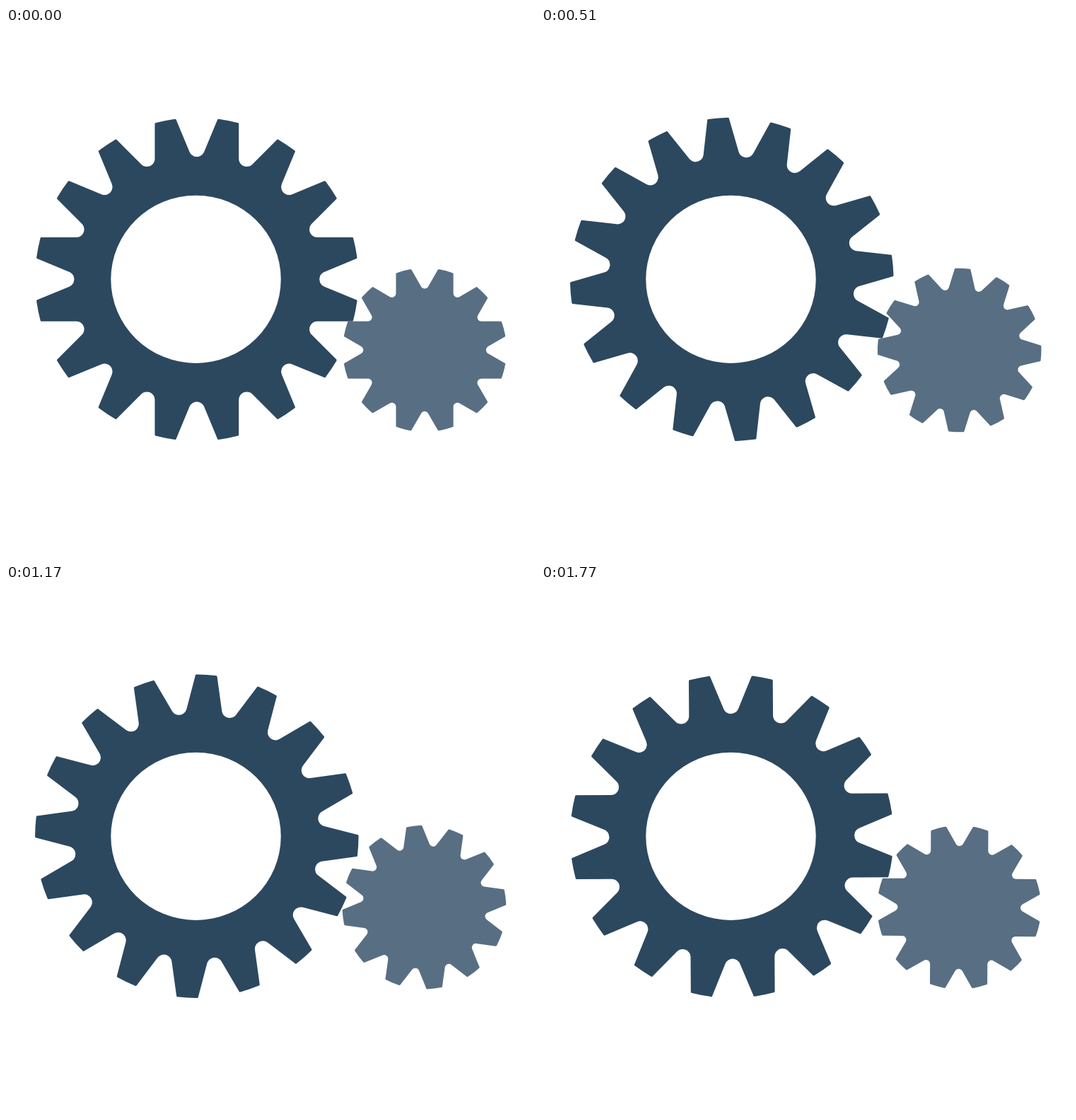
Animation of 748 by 748 pixels, one loop 1.8 s. Source, as an HTML page with a canvas:

```html
<!DOCTYPE html>
<html lang="en">
<head>
<meta charset="utf-8">
<title>Gears</title>
<style>
  html, body { margin: 0; width: 100%; height: 100%; overflow: hidden; background: #fff; }
  canvas { display: block; }
</style>
</head>
<body>
<canvas id="stage" width="748" height="748"></canvas>
<script>
const ctx = document.getElementById('stage').getContext('2d');
const LOOP = 1800, STEP = 30, RAD = Math.PI / 180;

// Angles run clockwise from the top.
const polar = (r, a) => [r * Math.sin(a), -r * Math.cos(a)];

// Tapered teeth with round valleys; a valley sits at the top.
function gearPath(teeth, outer, inner, halfTip) {
  const path = new Path2D();
  const pitch = 2 * Math.PI / teeth;
  const lean = pitch;
  const edge = pitch / 2 - halfTip;
  const [px, py] = polar(outer, edge);
  const r = (px * Math.cos(lean) + (inner + py) * Math.sin(lean)) / (1 - Math.sin(lean));
  const mid = inner + r;
  const nick = 3 / outer;
  const corner = 1.2;

  for (let i = 0; i < teeth; i++) {
    const g = i * pitch, next = g + pitch;
    const a1 = g + edge, a2 = next - edge;
    path.arc(...polar(mid, g), r, g + Math.PI - lean, g + lean, true);
    path.arcTo(...polar(outer, a1), ...polar(outer, a1 + nick), corner);
    path.arc(0, 0, outer, a1 + nick - Math.PI / 2, a2 - nick - Math.PI / 2);
    const [cx, cy] = polar(mid, next);
    const t = next + Math.PI - lean;
    path.arcTo(...polar(outer, a2), cx + r * Math.cos(t), cy + r * Math.sin(t), corner);
  }
  path.closePath();
  return path;
}

const big = gearPath(16, 228.7, 173.3, 3.8 * RAD);
const small = gearPath(12, 115.8, 86.8, 5.5 * RAD);

function drawGear(path, x, y, deg, color) {
  ctx.save();
  ctx.translate(x, y);
  ctx.rotate(deg * RAD);
  ctx.fillStyle = color;
  ctx.fill(path);
  ctx.restore();
}

function draw(t) {
  ctx.fillStyle = '#fff';
  ctx.fillRect(0, 0, 748, 748);

  drawGear(big, 269.8, 355.3, 22.5 * t / LOOP, '#2c485f');
  ctx.fillStyle = '#fff';
  ctx.beginPath();
  ctx.ellipse(268.5, 355.3, 120.2, 118.6, 0, 0, 2 * Math.PI);
  ctx.fill();

  // The small gear turns twice as fast for the first third.
  const turn = t < 600 ? t / 40 : 15 + (t - 600) / 80;
  const drift = turn / 30;
  drawGear(small, 592 - 0.8 * drift, 455.3 + 0.6 * drift, -turn, '#586e83');
}

const start = performance.now();
function tick() {
  const t = (performance.now() - start) % LOOP;
  draw(Math.floor(t / STEP) * STEP);
  requestAnimationFrame(tick);
}
tick();
</script>
</body>
</html>
```
